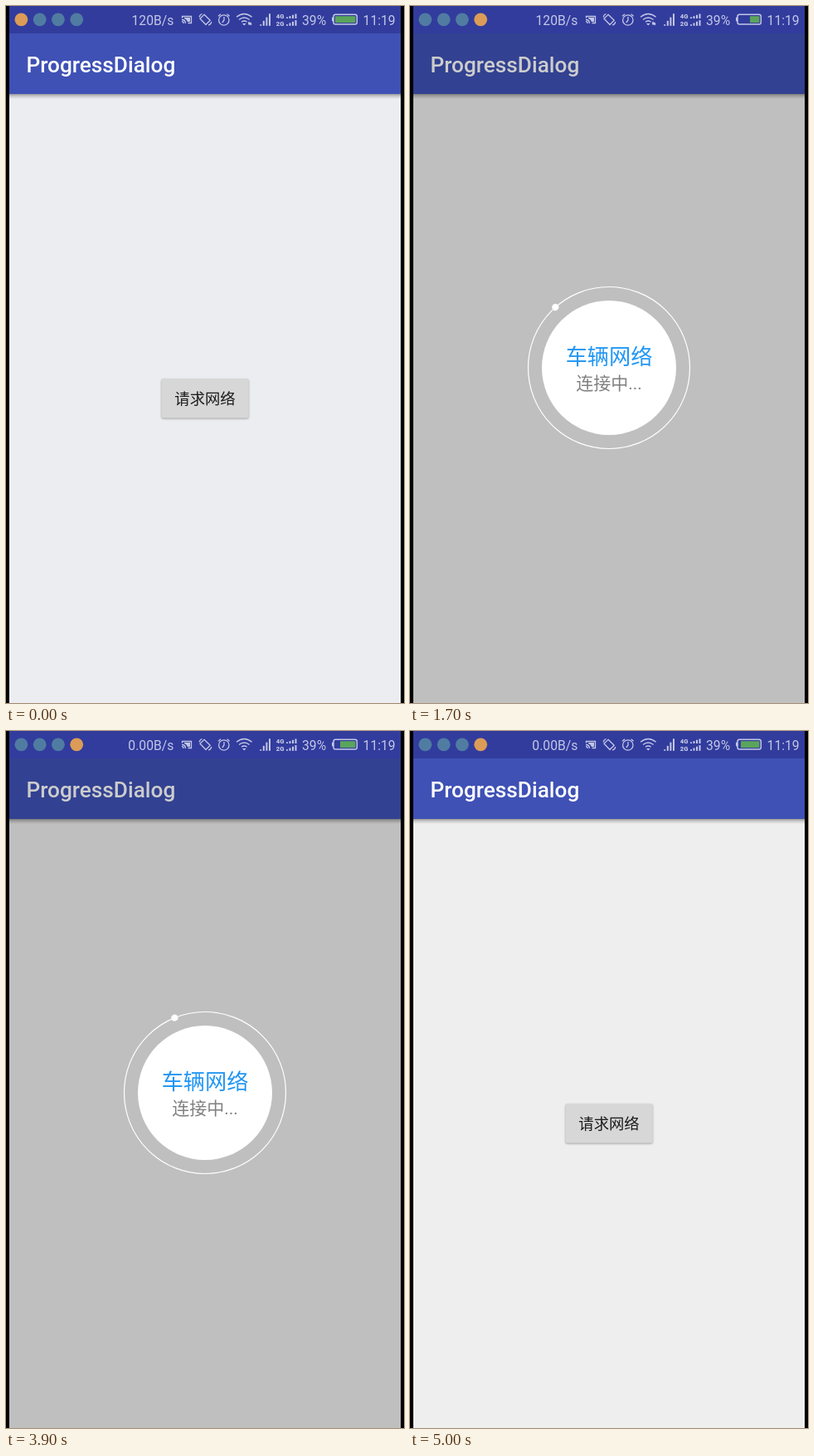
An HTML page that plays this animation: 480x840 px, repeating every 5100 ms.

```html
<!DOCTYPE html>
<html lang="zh-CN">
<head>
<meta charset="utf-8">
<title>ProgressDialog</title>
<style>
  html, body { margin: 0; width: 100%; height: 100%; overflow: hidden; background: #000; }
  svg { display: block; width: 100%; height: 100%; }
  text { font-family: Roboto, "Noto Sans CJK SC", "Noto Sans CJK", sans-serif; }
  .status text { font-size: 15.7px; fill: #c3c7e6; }
  .status .line { fill: none; stroke: #c3c7e6; stroke-width: 1.3; }
  .status .solid { fill: #c3c7e6; }
  .status .net { font-size: 7.6px; font-weight: 900; }
  #button rect { filter: drop-shadow(0 1px .8px rgba(0, 0, 0, .32)); }
  #button.pressed rect { fill: #d4d4d4; filter: drop-shadow(0 2.6px 2px rgba(0, 0, 0, .36)); }
</style>
</head>
<body>
<svg viewBox="0 0 480 840">
  <defs>
    <linearGradient id="shade" x2="0" y2="1">
      <stop offset="0" stop-opacity=".36"/>
      <stop offset=".4" stop-opacity=".17"/>
      <stop offset="1" stop-opacity="0"/>
    </linearGradient>
  </defs>

  <rect id="page" x="4" width="472" height="840" fill="#eee"/>
  <rect x="4" y="106" width="472" height="6" fill="url(#shade)"/>
  <rect x="4" y="33" width="472" height="73" fill="#3f51b5"/>
  <text x="24.5" y="80" font-size="26.2" font-weight="500" fill="#fff">ProgressDialog</text>

  <g id="button">
    <rect x="187.5" y="449" width="105.2" height="47.6" rx="2.4" fill="#d7d7d7"/>
    <text x="240" y="479.8" font-size="18.35" text-anchor="middle" fill="#1c1c1c">请求网络</text>
  </g>

  <g id="dialog">
    <rect x="4" y="33" width="472" height="807" opacity=".2"/>
    <circle cx="240" cy="436" r="97.5" fill="none" stroke="#fff" stroke-width="1.2"/>
    <circle cx="240" cy="436" r="81" fill="#fff"/>
    <circle id="dot" cx="240" cy="338.5" r="4" fill="#fff"/>
    <text x="240" y="431.6" font-size="26.2" text-anchor="middle" fill="#2196f3">车辆网络</text>
    <text x="240" y="461.9" font-size="21" text-anchor="middle" fill="#808080">连接中...</text>
  </g>

  <g class="status">
    <rect x="4" width="472" height="33" fill="#323c9d"/>
    <g id="notices"></g>
    <text id="speed" x="202.3" y="22.8" text-anchor="end"></text>

    <!-- cast -->
    <path class="line" stroke-width="1" d="M212.5 14.5v-2h11v8h-4M212 16.5q4.500 0 4.500 4.500M212 18.700q2.200 0 2.200 2.300"/>
    <path class="solid" d="M215 14h7v5h-3q-1-3-4-4z"/>

    <!-- rotation -->
    <path class="line" d="M239 10.300l7.200 7-5.200 5.200-7-7.200zM233.300 13.500q.2-3 3.200-4M247.700 19q-.3 3.200-3.500 4.200"/>

    <!-- alarm -->
    <circle class="line" cx="262.8" cy="17" r="6.200"/>
    <path class="line" d="M263 13v4l-2.200 3M256 12.300l3-2.600M269.600 12.300l-3-2.600"/>

    <!-- wifi -->
    <path class="line" d="M278 13.200q9.300-7.400 18.600 0M281 16.400q6.300-4.800 12.600 0M284 19.200q3.300-2.400 6.600 0"/>
    <path class="solid" d="M285 21h4.600l-2.300 2.600z"/>
    <path id="traffic" class="solid" d="M291.800 20.300l1.200-1.800 1.200 1.800v2.500h-1.700zM294.400 19.800h1.400v1.800h1l-1.500 2-1.500-2z"/>

    <g id="bars" class="solid"></g>
    <text class="net" x="325.8" y="15">4G</text>
    <text class="net" x="325.8" y="23.700">2G</text>
    <text x="357" y="22.8">39%</text>

    <!-- battery -->
    <rect class="line" x="395" y="10.300" width="28.300" height="11.700" rx="2.300" style="stroke-width:1.500"/>
    <rect class="solid" x="393" y="13.600" width="2" height="5" rx=".8"/>
    <rect id="charge" y="12.200" height="7.900" fill="#5aa45c"/>
    <text x="430.6" y="22.8">11:19</text>
  </g>
</svg>

<script>
const LOOP = 5100, TICK = 100;
const OPENED = 1700, CLOSED = 4600, SPIN_START = 1575, SPIN = 2000;
const el = id => document.getElementById(id);

function add(parent, tag, attrs) {
  const node = document.createElementNS(parent.namespaceURI, tag);
  for (const key in attrs) node.setAttribute(key, attrs[key]);
  return parent.appendChild(node);
}

function addBars(x, bottom, count, step, width, rise) {
  for (let i = 0; i < count; i++) {
    const height = 1.6 + i * rise;
    add(el('bars'), 'rect', { x: x + i * step, y: bottom - height, width, height });
  }
}

const notices = [18.4, 40.7, 62.9, 85.2].map(cx =>
  add(el('notices'), 'circle', { cx, cy: 16.3, r: 7.9 }));
addBars(306.2, 23.8, 4, 3.6, 2, 4.3);
addBars(338, 15, 4, 3.5, 2, 1.3);
addBars(338, 23.8, 4, 3.5, 2, 1.7);

// Each turn eases in and out, starting at the upper left.
function dotAngle(t) {
  const turn = ((t - SPIN_START) % SPIN) / SPIN;
  return -45 + 180 * (1 - Math.cos(Math.PI * turn));
}

function draw(t) {
  const open = t >= OPENED && t < CLOSED;
  const orange = t < 900 ? 0 : 3;
  notices.forEach((n, i) => n.setAttribute('fill', i === orange ? '#dc9c57' : '#507ca2'));
  el('page').setAttribute('fill', t < 900 ? '#ecedf0' : '#eee');

  el('speed').textContent = t < 2200 ? '120B/s' : '0.00B/s';
  el('traffic').style.display = t < 2200 ? '' : 'none';

  const left = t < 700 ? 397 : Math.round(415.5 - 0.0033 * t);
  el('charge').setAttribute('x', left);
  el('charge').setAttribute('width', 421.4 - left);

  el('button').classList.toggle('pressed', t >= 1400 && t < OPENED);
  el('button').style.display = open ? 'none' : '';
  el('dialog').style.display = open ? '' : 'none';
  if (open) el('dot').setAttribute('transform', `rotate(${dotAngle(t)} 240 436)`);
}

const start = performance.now();
function frame() {
  const t = (performance.now() - start) % LOOP;
  draw(Math.floor(t / TICK) * TICK);
  requestAnimationFrame(frame);
}
frame();
</script>
</body>
</html>
```
